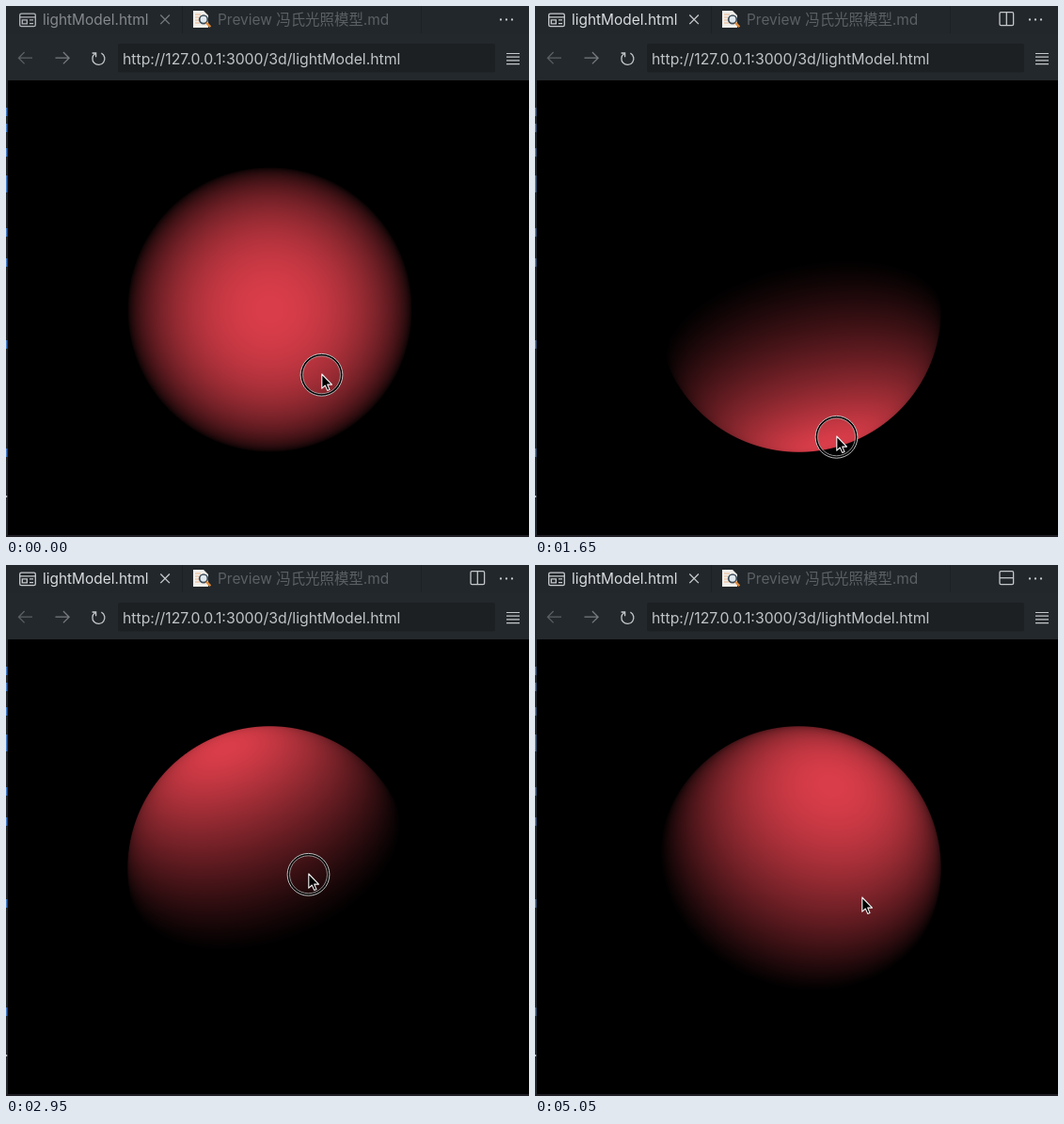
Recreate the animation shown at these times as an HTML page with a canvas. Size 556 by 564 pixels, loop 5.1 s.

```html
<!DOCTYPE html>
<html lang="zh-CN">
<head>
<meta charset="utf-8">
<title>Light model</title>
<style>
  html, body { margin: 0; width: 100%; height: 100%; overflow: hidden; background: #000; }
  svg, canvas { position: absolute; left: 0; top: 0; display: block; }
  text { font: 15.45px Inter, "Noto Sans CJK SC", "Noto Sans CJK", sans-serif; }
  #url { font-size: 15.8px; }
  .line { fill: none; stroke-width: 1.3; }
  #title { fill: #d9dcde; }
  #tabIcon, #close { stroke: #c9ccce; }
  .idle #title { fill: #85898d; }
  .idle #tabIcon { stroke: #b4b7ba; }
  .idle #close { stroke: #777b7f; }
  .idle #split { display: none; }
</style>
</head>
<body>
<svg id="ui" width="556" height="564">
  <rect width="556" height="564" fill="#22272b"/>
  <rect y="30" width="556" height="49" fill="#23282c"/>
  <path d="M187.5 0V29M441.5 0V29" stroke="#1d2125"/>
  <rect x="119" y="40" width="401" height="30.5" rx="2" fill="#1c2023"/>
  <rect x="2" y="79" width="554" height="483" fill="#000"/>
  <rect y="562" width="556" height="2" fill="#211f26"/>
  <path id="marks" stroke="#3f78c4" stroke-width="1.4"/>
  <path d="M0 521h1.2" stroke="#b9bcbf" stroke-width="2"/>

  <g id="tabIcon" class="line">
    <rect x="14.7" y="8.2" width="16.6" height="13.4" rx="1.6"/>
    <path d="M15 11.9H31M17.3 14.8h5v4h-5zM25 14.8h4M25 18.6h4"/>
  </g>
  <text id="title" x="39" y="20">lightModel.html</text>
  <path id="close" class="line" d="M164.3 9.5l9.6 9.6M173.9 9.5l-9.6 9.6"/>

  <path d="M199 5h11l5 5v13h-16z" fill="#f1efeb"/>
  <path d="M201 9h6M201 12h4M201 15h4M201 18h5" stroke="#e8b48a" stroke-width="1.2"/>
  <circle cx="210" cy="14.3" r="4.3" fill="#dfe8ee" stroke="#3b4a57" stroke-width="1.7"/>
  <path d="M213 17.6l4.3 4.6" stroke="#e08a3c" stroke-width="2.4"/>
  <text x="225" y="20" fill="#5b6065">Preview 冯氏光照模型.md</text>

  <g id="split" class="line" stroke="#c5c8ca">
    <rect x="494" y="6.7" width="14.6" height="14" rx="1.4"/>
    <path id="divider"/>
  </g>
  <path d="M526 14.5h12.1" stroke="#c5c8ca" stroke-width="2.3" stroke-linecap="round" stroke-dasharray="0 6"/>

  <path class="line" d="M28 55.2H13.5M19.6 49l-6.2 6.2 6.2 6.2" stroke="#5a5f63"/>
  <path class="line" d="M52.5 55.2H67M60.9 49l6.2 6.2-6.2 6.2" stroke="#777b7f"/>
  <path class="line" d="M94.6 50.7A6.5 6.5 0 1 0 101.4 50.2M91.6 50h4v4.2" stroke="#c5c8ca"/>
  <text id="url" x="124" y="62" fill="#bfc3c6">http://127.0.0.1:3000/3d/lightModel.html</text>
  <path d="M532 50.5h14M532 54.2h14M532 57.9h14M532 61.6h14" stroke="#c5c8ca" stroke-width="1.2"/>
</svg>
<canvas id="ball" width="306" height="306" style="left:128px;top:170px"></canvas>
<svg width="556" height="564">
  <g id="pointer">
    <g id="ring" fill="none">
      <circle r="21.3" stroke="#000" stroke-width="2.4"/>
      <circle r="22.4" stroke="#d4d4d4" stroke-width="0.9"/>
      <circle r="20" stroke="#b4b4b4" stroke-width="0.8"/>
    </g>
    <path d="M0.3 -0.8V14.4L3.8 11.2L6.2 16.6L8.5 15.6L6.2 10.3H11Z" fill="#000" stroke="#f4f4f4" stroke-width="1.1" stroke-linejoin="round"/>
  </g>
</svg>
<script>
const LOOP = 5100, STEP = 50;
const SIZE = 306, RADIUS = 151.3, CENTER = 152.5;
const CAMERA = 3, LAMP = 3, FALLOFF = 1.25;
const COLOR = [217, 61, 73];

// Drag stops: pointer in pixels, lamp angles in degrees
const STOPS = [
  { t: 0, x: 335, y: 391, yaw: 0, pitch: 0 },
  { t: 700, x: 358, y: 415, yaw: 16, pitch: 10 },
  { t: 1650, x: 320, y: 457, yaw: 18, pitch: 55 },
  { t: 2150, x: 244, y: 371, yaw: -74, pitch: -2 },
  { t: 2950, x: 321, y: 328, yaw: -21, pitch: -44 },
  { t: 3350, x: 349, y: 351, yaw: 14, pitch: -32 },
  { t: 4400, x: 349, y: 351, yaw: 14, pitch: -32 },
  { t: 4900, x: 347, y: 353, yaw: 11, pitch: -26 }
];

const $ = id => document.getElementById(id);
const ctx = $("ball").getContext("2d");
const image = ctx.createImageData(SIZE, SIZE);

$("marks").setAttribute("d",
  [108, 125, 151, 180, 189, 236, 268, 355, 470].map(y => `M0.7 ${y}v9`).join(""));

// Surface normals of a unit sphere seen in perspective
function traceSphere() {
  const points = [];
  const focal = RADIUS * Math.sqrt(CAMERA * CAMERA - 1);
  const b = focal * CAMERA;
  for (let y = 0; y < SIZE; y++) {
    for (let x = 0; x < SIZE; x++) {
      const dx = x + 0.5 - CENTER, dy = y + 0.5 - CENTER;
      const cover = Math.min(1, RADIUS + 0.5 - Math.hypot(dx, dy));
      if (cover <= 0) continue;
      const a = dx * dx + dy * dy + focal * focal;
      const root = Math.sqrt(Math.max(0, b * b - a * (CAMERA * CAMERA - 1)));
      const s = (b - root) / a;
      const n = [dx * s, dy * s, CAMERA - focal * s];
      const len = Math.hypot(...n);
      points.push({ at: (y * SIZE + x) * 4, cover, n: n.map(v => v / len) });
    }
  }
  return points;
}
const surface = traceSphere();

function slope(i, key) {
  if (i < 1 || i > STOPS.length - 2) return 0;
  const rate = j => (STOPS[j + 1][key] - STOPS[j][key]) / (STOPS[j + 1].t - STOPS[j].t);
  const p = rate(i - 1), q = rate(i);
  return p * q > 0 ? 2 * p * q / (p + q) : 0;
}

// Smooth curve through the stops, without overshoot
function valueAt(t, key) {
  let i = 0;
  while (i < STOPS.length - 2 && t >= STOPS[i + 1].t) i++;
  const from = STOPS[i], to = STOPS[i + 1];
  const span = to.t - from.t;
  const u = Math.min(1, (t - from.t) / span), v = 1 - u;
  return from[key] * (1 + 2 * u) * v * v + to[key] * (1 + 2 * v) * u * u +
    span * u * v * (slope(i, key) * v - slope(i + 1, key) * u);
}

function shade(yaw, pitch) {
  const a = yaw * Math.PI / 180, b = pitch * Math.PI / 180;
  const lx = LAMP * Math.sin(a) * Math.cos(b);
  const ly = LAMP * Math.sin(b);
  const lz = LAMP * Math.cos(a) * Math.cos(b);
  for (const { at, cover, n } of surface) {
    const dot = n[0] * lx + n[1] * ly + n[2] * lz;
    const dist = Math.sqrt(LAMP * LAMP + 1 - 2 * dot);
    const light = Math.max(0, (dot - 1) / dist) ** FALLOFF * cover;
    COLOR.forEach((c, k) => image.data[at + k] = c * light);
    image.data[at + 3] = 255;
  }
  ctx.putImageData(image, 0, 0);
}

function render(t) {
  const x = valueAt(t, "x") + 0.5, y = valueAt(t, "y") + 0.8;
  shade(valueAt(t, "yaw"), valueAt(t, "pitch"));
  $("pointer").setAttribute("transform", `translate(${x.toFixed(1)} ${y.toFixed(1)})`);
  $("ring").style.display = t < 4750 ? "" : "none";
  $("ui").classList.toggle("idle", t < 100);
  $("divider").setAttribute("d", t < 4850 ? "M501.3 7v14" : "M494 13.7h14.6");
}

const start = performance.now();
let shown = -1;
function tick() {
  const t = Math.floor((performance.now() - start) % LOOP / STEP) * STEP;
  if (t !== shown) render(shown = t);
  requestAnimationFrame(tick);
}
tick();
</script>
</body>
</html>
```
